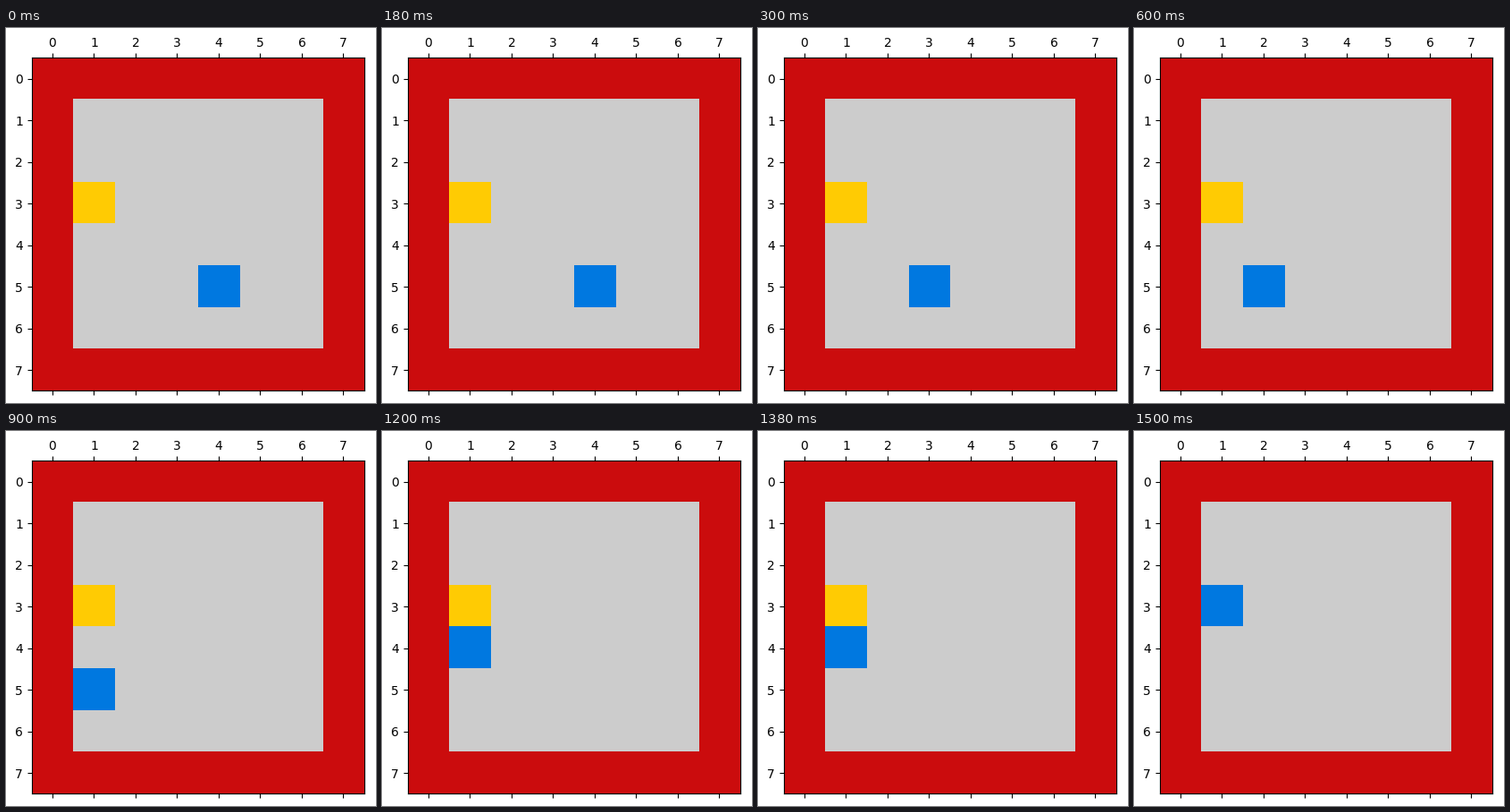
Write a matplotlib script that moves like this. It is 414 by 419 pixels and loops after 1.8 s.

```python
import numpy as np
import matplotlib.pyplot as plt
from matplotlib.animation import FuncAnimation
from matplotlib.colors import ListedColormap

W, H, DPI = 414, 419, 100
EPS = 1e-3  # keeps the pixel size from rounding down
SIZE = 8
FLOOR, WALL, GOAL, AGENT = range(4)
COLORS = ListedColormap(["#cccccc", "#cb0c0d", "#ffcb03", "#0078e0"])

START, CORNER, TARGET = (5, 4), (5, 1), (3, 1)


def walk(*stops):
    """Cells visited one step at a time along straight legs (row, col)."""
    cells = [stops[0]]
    for stop in stops[1:]:
        while cells[-1] != stop:
            cells.append(tuple(c + int(np.sign(s - c))
                               for c, s in zip(cells[-1], stop)))
    return cells


def board(agent):
    grid = np.full((SIZE, SIZE), WALL)
    grid[1:-1, 1:-1] = FLOOR
    grid[TARGET] = GOAL
    grid[agent] = AGENT
    return grid


path = walk(START, CORNER, TARGET)

fig = plt.figure(figsize=((W + EPS) / DPI, (H + EPS) / DPI), dpi=DPI,
                 facecolor="white")
ax = fig.add_axes([28.72 / W, 13.52 / H, 372 / W, 372 / H])
image = ax.matshow(board(path[0]), cmap=COLORS, vmin=FLOOR, vmax=AGENT,
                   interpolation="nearest")
ax.set_xticks(range(SIZE))
ax.set_yticks(range(SIZE))


def update(step):
    image.set_data(board(path[step]))
    return (image,)


anim = FuncAnimation(fig, update, frames=len(path), interval=300,
                     repeat=True, repeat_delay=0, blit=False)
plt.show()
```
